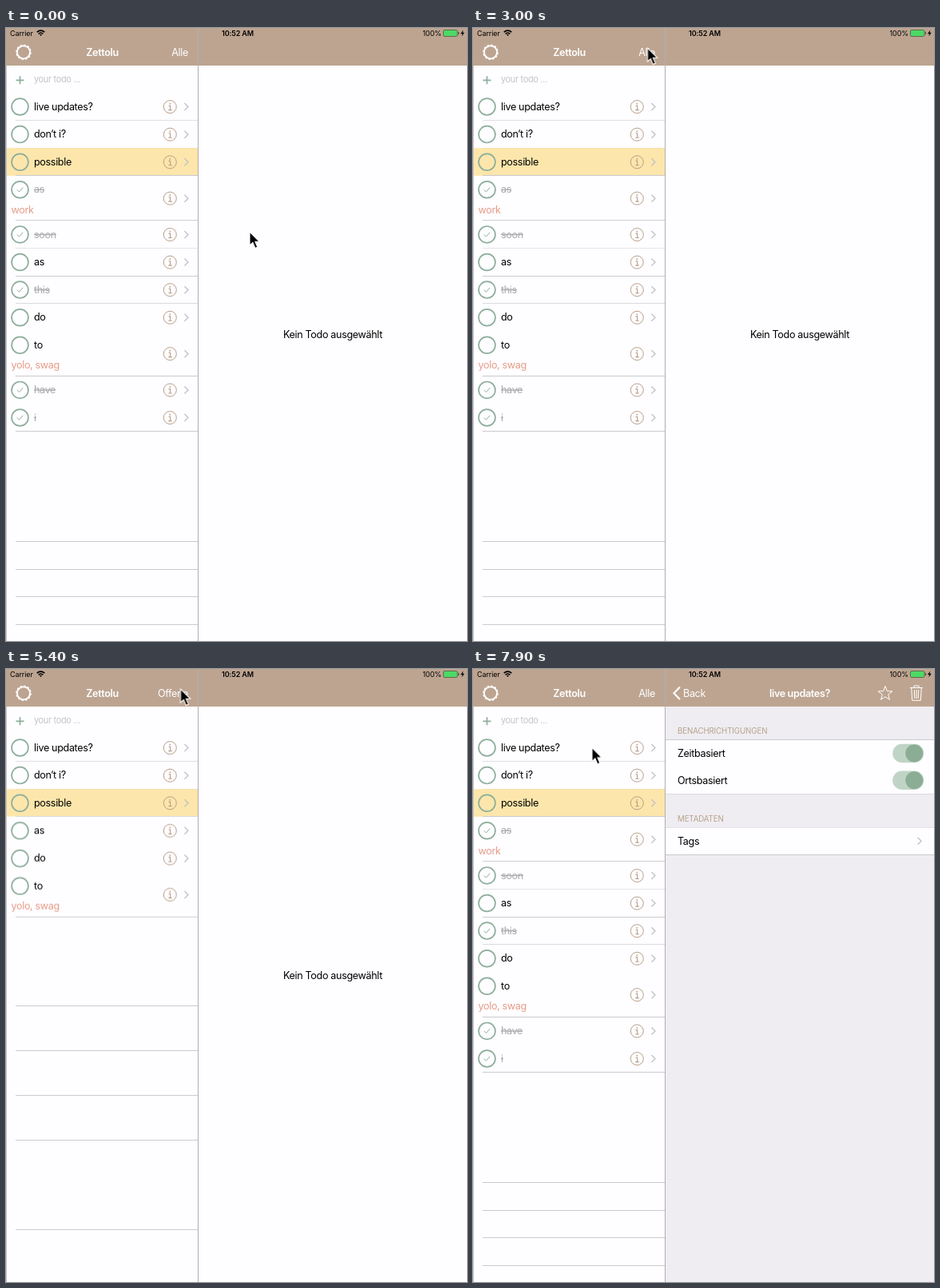
An HTML page for the animation above (8 s loop, 577x767 px).

```html
<!DOCTYPE html>
<html lang="de">
<head>
<meta charset="utf-8">
<title>Todo list</title>
<style>
  html, body { margin: 0; width: 100%; height: 100%; overflow: hidden; background: #fefdff; }
  svg { display: block; }
  text { font: 12.6px Inter, Roboto, sans-serif; letter-spacing: -.35px; }
  .bold { font-weight: 600; }
  .white { fill: #fff; }
  .status { font-size: 9px; letter-spacing: -.1px; }
  .hint { font-size: 11px; fill: #c5c4c8; }
  .section { font-size: 9.7px; letter-spacing: -.1px; fill: #b7a28c; }
  .tag { fill: #e69c88; }
  .done { fill: #a9a8aa; text-decoration: line-through; }
  .line { fill: #cbcacd; }
  .ring, .check, .plus { fill: none; stroke: #8dae9c; }
  .ring { stroke-width: 1.7; }
  .plus { stroke-width: 1.7; }
  .info { fill: none; stroke: #b99d88; }
  .chevron { fill: none; stroke: #c4c3c8; stroke-width: 1.4; }
  .icon { fill: none; stroke: #fff; }

  /* All parts share one 8 s clock. */
  .move, .gone, .appear, .all, .open, .cursor, .push, .under, .nav {
    animation: 8s ease-in-out infinite;
  }
  .move { animation-name: move; }
  .gone { animation-name: gone; }
  .appear { animation-name: appear; }
  .all { animation-name: all; animation-timing-function: step-end; }
  .open { animation-name: open; animation-timing-function: step-end; }
  .cursor { animation-name: cursor; }
  .push { animation-name: push; }
  .under { animation-name: under; }
  .nav { animation-name: nav; }
  .push, .under, .nav { animation-timing-function: cubic-bezier(.25, .8, .25, 1); }

  @keyframes move {
    0%, 20.6%, 36.9%, 50.6%, 76.9%, 100% { transform: translateY(0); }
    24.4%, 33.1%, 54.4%, 73.1% { transform: translateY(var(--dy)); }
  }
  @keyframes gone {
    0%, 20.6%, 36.9%, 50.6%, 76.9%, 100% { opacity: 1; }
    24.4%, 33.1%, 54.4%, 73.1% { opacity: 0; }
  }
  @keyframes appear {
    0%, 20.6%, 36.9%, 50.6%, 76.9%, 100% { opacity: 0; }
    24.4%, 33.1%, 54.4%, 73.1% { opacity: 1; }
  }
  @keyframes all {
    0%, 33.1%, 73.1%, 100% { opacity: 1; }
    17.5%, 48.7% { opacity: .2; }
    20.6%, 50.6% { opacity: 0; }
  }
  @keyframes open {
    0%, 33.1%, 73.1%, 100% { opacity: 0; }
    20.6%, 50.6% { opacity: 1; }
    31.2%, 71.2% { opacity: .2; }
  }
  @keyframes cursor {
    0%, 4% { transform: translate(305px, 255px); }
    16%, 80% { transform: translate(218.5px, 25px); }
    86.5%, 92% { transform: translate(203px, 100px); }
    98%, 100% { transform: translate(149px, 98.5px); }
  }
  @keyframes push {
    0%, 90.6% { transform: translateX(336px); }
    96.9%, 100% { transform: translateX(0); }
  }
  @keyframes under {
    0%, 90.6% { transform: translateX(0); }
    96.9%, 100% { transform: translateX(-100px); }
  }
  @keyframes nav {
    0%, 90.6% { opacity: 0; transform: translateX(90px); }
    96.9%, 100% { opacity: 1; transform: translateX(0); }
  }
</style>
</head>
<body>
<svg width="577" height="767" viewBox="0 0 577 767">
  <defs>
    <clipPath id="right"><rect x="241" width="336" height="767"/></clipPath>
    <path id="arrow" class="chevron" d="M-2.3 -4.5L2.3 0L-2.3 4.5"/>
    <g id="info" class="info">
      <circle r="8"/>
      <path d="M-1.8 -1.4H.3V4M-2 4H2.4" stroke-width="1.1"/>
      <circle cy="-3.9" r=".9" fill="#b99d88" stroke="none"/>
    </g>
    <g id="toggle">
      <rect x="-19.5" y="-11.7" width="39" height="23.4" rx="11.7" fill="#c0d4c6"/>
      <circle cx="7.5" r="11" fill="#8cad95"/>
    </g>
  </defs>

  <rect width="577" height="767" fill="#fefdff"/>

  <g clip-path="url(#right)">
    <text class="under" x="409" y="388" text-anchor="middle">Kein Todo ausgewählt</text>
    <g class="push">
      <rect x="241" y="47" width="336" height="720" fill="#efedf2"/>
      <g fill="#fefdff">
        <rect x="241" y="89" width="336" height="67"/>
        <rect x="241" y="198" width="336" height="34"/>
      </g>
      <g class="line">
        <rect x="241" y="88" width="336" height="1"/>
        <rect x="241" y="156" width="336" height="1" opacity=".5"/>
        <rect x="241" y="198" width="336" height="1" opacity=".5"/>
        <rect x="241" y="232" width="336" height="1"/>
      </g>
      <text class="section" x="256" y="81">BENACHRICHTIGUNGEN</text>
      <text x="256" y="110">Zeitbasiert</text>
      <text x="256" y="144">Ortsbasiert</text>
      <text class="section" x="256" y="191">METADATEN</text>
      <text x="256" y="219.5">Tags</text>
      <use href="#toggle" x="544.7" y="105.5"/>
      <use href="#toggle" x="544.7" y="139.3"/>
      <use href="#arrow" x="558.8" y="215.3"/>
    </g>
  </g>

  <g id="list"></g>
  <path class="plus" d="M12.5 65.3H22.5M17.5 60.3V70.3"/>
  <text class="hint" x="35" y="68">your todo ...</text>

  <rect width="577" height="47" fill="#bda491"/>
  <rect y="47" width="1" height="720" fill="#c6c4c7"/>
  <rect x="240" width="1" height="767" fill="#b3aeb0"/>

  <!-- status bar -->
  <text class="status" x="5" y="10">Carrier</text>
  <g fill="none" stroke="#000" stroke-width="1.6">
    <path d="M38.7 5.2Q43.5 .9 48.3 5.2M40.6 7.3Q43.5 4.7 46.4 7.3"/>
    <path d="M42 8.3L43.5 10L45 8.3Q43.5 7.2 42 8.3Z" fill="#000" stroke="none"/>
  </g>
  <text class="status bold" x="290" y="10" text-anchor="middle">10:52 AM</text>
  <text class="status" x="545" y="10" text-anchor="end">100%</text>
  <rect x="547.5" y="2.5" width="17.5" height="8" rx="1.6" fill="#4cd964" stroke="#5c5149" stroke-width=".8"/>
  <rect x="565.8" y="4.8" width="1.3" height="3.4" rx=".6" fill="#5c5149"/>
  <path d="M572.4 2.2L569 7.2H571.2L570.4 10.6L573.8 5.7H571.6Z"/>

  <!-- navigation bars -->
  <g class="icon">
    <circle cx="22" cy="30.3" r="8" stroke-width="1.8"/>
    <circle cx="22" cy="30.3" r="9.1" stroke-width="1.3" pathLength="24" stroke-dasharray="1.2 .8"/>
  </g>
  <text class="bold white" x="120.5" y="35" text-anchor="middle">Zettolu</text>
  <text class="white all" x="228" y="35" text-anchor="end">Alle</text>
  <text class="white open" x="228" y="35" text-anchor="end">Offene</text>
  <g clip-path="url(#right)">
    <g class="nav">
      <path class="icon" d="M259 22.5L251.5 30.3L259 38.1" stroke-width="2.2"/>
      <text class="white" x="263" y="35">Back</text>
      <text class="bold white" x="409" y="35" text-anchor="middle">live updates?</text>
      <path id="star" class="icon"/>
      <g class="icon">
        <path d="M547 23.5H563M552 23.5V21H558V23.5M548.7 23.5L549.7 39.3H560.3L561.3 23.5"/>
        <path d="M552.3 26L552.8 37M555 26V37M557.7 26L557.2 37"/>
      </g>
    </g>
  </g>

  <path class="cursor" d="M0 0V17L3.9 13.4L6.8 20.4L9.8 19.1L6.9 12.3H12.2Z" stroke="#fff" stroke-width="1.1"/>
</svg>
<script>
  const ROW = 34.6, TALL = 56.1, TOP = 81;
  const todos = [
    { name: 'live updates?' },
    { name: 'don‘t i?' },
    { name: 'possible', starred: true },
    { name: 'as', tags: 'work', done: true },
    { name: 'soon', done: true },
    { name: 'as', line: 'gone' },
    { name: 'this', done: true },
    { name: 'do', line: 'none' },
    { name: 'to', tags: 'yolo, swag' },
    { name: 'have', done: true },
    { name: 'i', done: true }
  ];

  const rule = (y, cls = '') =>
    `<rect class="line ${cls}" x="12" y="${Math.floor(y)}" width="228" height="1"/>`;

  function row(todo, y, dy) {
    const h = todo.tags ? TALL : ROW;
    const mid = y + h / 2, head = y + ROW / 2;
    const check = `<path class="check" d="M13.8 ${head + .3}l2.6 2.6l4.8 -5.4"/>`;
    return `<g class="${todo.done ? 'gone' : 'move'}" style="--dy:${dy}px">
      <rect y="${y}" width="240" height="${h}" fill="${todo.starred ? '#fce6ab' : '#fefdff'}"/>
      ${todo.line === 'none' ? '' : rule(y + h, todo.line)}
      <circle class="ring" cx="17.5" cy="${head + .2}" r="10.4"/>
      ${todo.done ? check : ''}
      <text x="35" y="${y + 21.6}" class="${todo.done ? 'done' : ''}">${todo.name}</text>
      ${todo.tags ? `<text x="6.5" y="${y + 46.8}" class="tag">${todo.tags}</text>` : ''}
      <use href="#info" x="205.3" y="${mid + .3}"/>
      <use href="#arrow" x="225.7" y="${mid + .3}"/>
    </g>`;
  }

  let y = TOP, openY = TOP, fading = '', staying = '';
  for (const todo of todos) {
    const h = todo.tags ? TALL : ROW;
    const html = row(todo, y, openY - y);
    if (todo.done) fading += html;
    else {
      staying += html;
      openY += h;
    }
    y += h;
  }

  // Separators of the empty rows below each list.
  const blanks = (ys, cls) => `<g class="${cls}">${ys.map(v => rule(v)).join('')}</g>`;
  document.getElementById('list').innerHTML =
    blanks([642, 677, 711, 746], 'gone') +
    blanks([421, 477, 533, 589, 701], 'appear') + fading + staying;

  const points = Array.from({ length: 10 }, (_, i) => {
    const r = i % 2 ? 3.9 : 9.3, a = i * Math.PI / 5;
    return `${516 + r * Math.sin(a)} ${30.8 - r * Math.cos(a)}`;
  });
  document.getElementById('star').setAttribute('d', `M${points.join('L')}Z`);
</script>
</body>
</html>
```
